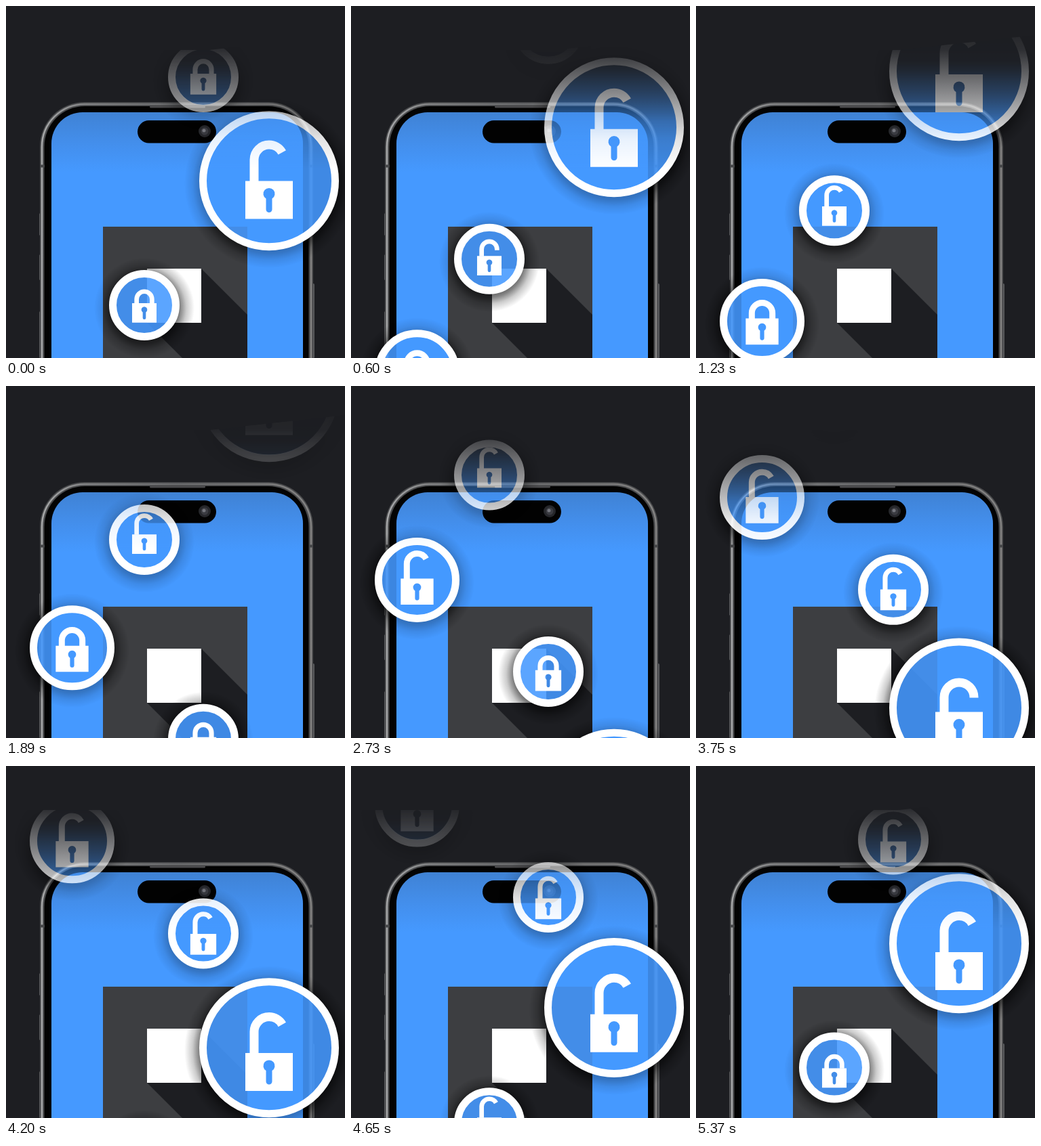
An HTML page for the animation above (5.4 s loop, 500 by 520 pixels).

```html
<!DOCTYPE html>
<html lang="en">
<head>
<meta charset="utf-8">
<title>Floating locks</title>
<style>
  html, body { margin: 0; width: 100%; height: 100%; overflow: hidden; background: #1d1e22; }
  svg { display: block; width: 500px; height: 520px; }
</style>
</head>
<body>
<svg id="stage" viewBox="0 0 500 520" xmlns="http://www.w3.org/2000/svg">
  <defs>
    <linearGradient id="screen" gradientUnits="userSpaceOnUse" x1="0" y1="157" x2="0" y2="245">
      <stop offset="0" stop-color="#3f82d4"/>
      <stop offset=".45" stop-color="#438de9"/>
      <stop offset="1" stop-color="#4599ff"/>
    </linearGradient>
    <linearGradient id="rim" gradientUnits="userSpaceOnUse" x1="50" y1="0" x2="453" y2="0">
      <stop offset="0" stop-color="#a9aaab"/>
      <stop offset=".15" stop-color="#868788"/>
      <stop offset=".5" stop-color="#6a6b6d"/>
      <stop offset="1" stop-color="#858483"/>
    </linearGradient>
    <linearGradient id="fade" gradientUnits="userSpaceOnUse" x1="0" y1="40" x2="0" y2="240">
      <stop offset="0" stop-color="#fff" stop-opacity=".04"/>
      <stop offset=".125" stop-color="#fff" stop-opacity=".08"/>
      <stop offset=".33" stop-color="#fff" stop-opacity=".34"/>
      <stop offset=".55" stop-color="#fff" stop-opacity=".61"/>
      <stop offset=".78" stop-color="#fff" stop-opacity=".88"/>
      <stop offset="1" stop-color="#fff"/>
    </linearGradient>
    <linearGradient id="glassFade" gradientUnits="userSpaceOnUse" x1="0" y1="80" x2="0" y2="170">
      <stop offset="0" stop-color="#fff" stop-opacity=".1"/>
      <stop offset=".35" stop-color="#fff" stop-opacity=".55"/>
      <stop offset="1" stop-color="#fff"/>
    </linearGradient>
    <mask id="fadeMask" maskUnits="userSpaceOnUse" x="0" y="0" width="500" height="520">
      <rect width="500" height="520" fill="url(#fade)"/>
    </mask>
    <mask id="glassMask" maskUnits="userSpaceOnUse" x="0" y="0" width="500" height="520">
      <rect width="500" height="520" fill="url(#glassFade)"/>
    </mask>
    <!-- shadows are faint on the bright screen -->
    <mask id="shadowMask" maskUnits="userSpaceOnUse" x="0" y="0" width="500" height="520">
      <rect width="500" height="520" fill="#fff"/>
      <rect x="67" y="157" width="371" height="440" rx="47" fill="#777"/>
      <path d="M143 326H356V520H143Z" fill="#fff"/>
    </mask>
    <clipPath id="top"><path d="M0 65H300L500 43V520H0Z"/></clipPath>
  </defs>

  <rect width="500" height="520" fill="#1d1e22"/>

  <!-- phone -->
  <g fill="#57585a">
    <rect x="49" y="306" width="4" height="33" rx="1.5"/>
    <rect x="49" y="367" width="4" height="38" rx="1.5"/>
    <rect x="49" y="451" width="4" height="69" rx="1.5"/>
    <rect x="451" y="410" width="4" height="110" rx="1.5"/>
  </g>
  <rect x="50" y="142" width="403" height="460" rx="66" fill="#4a4b4d"/>
  <rect x="53" y="145" width="397" height="460" rx="63" fill="none" stroke="url(#rim)" stroke-width="2.500"/>
  <rect x="56.500" y="148" width="390" height="460" rx="60" fill="#030303"/>
  <rect x="212" y="147.500" width="82" height="3" rx="1.5" fill="#4b4b4d"/>
  <path d="M50 236.500h7M447 236.500h6" stroke="#454648" stroke-width="4"/>
  <rect x="67" y="157" width="371" height="440" rx="46" fill="url(#screen)"/>
  <rect x="194" y="169" width="116" height="33.500" rx="16.750" fill="#020202"/>
  <circle cx="293" cy="185" r="9" fill="#26272b"/>
  <circle cx="293" cy="185" r="5.500" fill="#3b3c42"/>
  <circle cx="292" cy="184" r="2.500" fill="#74757c"/>

  <!-- card -->
  <rect x="143" y="326" width="213" height="194" fill="#3d3e41"/>
  <path d="M288 388L356 456V520H260L208 468Z" fill="#1d1e22"/>
  <rect x="208" y="388" width="80" height="80" fill="#fff"/>

  <g clip-path="url(#top)">
    <g mask="url(#fadeMask)">
      <g id="shadows" mask="url(#shadowMask)"></g>
      <g id="discs" mask="url(#glassMask)"></g>
      <g id="rings"></g>
    </g>
  </g>
</svg>
<script>
const LOOP = 5400, STEP = 30;
const RING = 11, GLOW = 22;

// y: centre at time 0, rise: distance per loop, wrap: time it re-enters below
// keys: [time, lock offset, how far open]
const bubbles = [
  { x: 204, r: 52, y: 442, rise: 614, wrap: 4100, scale: .515,
    keys: [[0, -3, 0], [450, -4.2, 0], [800, -5.1, 1], [4100, -13.7, 1],
           [4101, -8, 1], [4650, -8, 1], [4850, -5.5, 1], [5200, -1.1, 0], [5400, 1.4, 0]] },
  { x: 97.5, r: 62.5, y: 612.5, rise: 645, wrap: 5399, scale: .69,
    keys: [[0, -5.7, 0], [2000, -2.9, 0], [2400, -2.4, 1], [5400, 1.8, 1]] },
  { x: 291, r: 52, y: 105, rise: 641, wrap: 1200, scale: .547,
    keys: [[0, -5, 0], [3000, -1.8, 0], [3350, -1.1, 1], [5400, 3, 1]] },
  { x: 388, r: 103, y: 258.2, rise: 711, wrap: 2400, scale: 1,
    keys: [[0, .4, 1], [2400, 9.1, 1], [2401, .2, 0], [3580, 5.3, 0], [3920, 6.7, 1], [5400, 13.1, 1]] }
];

const BODY = "M-35 0H35V56H-35Z" +
  "M-4.500 26V42a4.500 4.500 0 0 0 9 0V26a8.500 8.500 0 1 0-9 0Z";
const BEND = 22, LEG = 11.5;

const byId = id => document.getElementById(id);

function add(parent, markup) {
  byId(parent).insertAdjacentHTML("beforeend", markup);
  return byId(parent).lastElementChild;
}

bubbles.forEach((b, i) => {
  const out = b.r + GLOW, at = d => (b.r + d) / out;
  b.shadow = add("shadows", `<g>
    <radialGradient id="glow${i}">
      <stop offset="${at(-8)}" stop-color="#000" stop-opacity="0"/>
      <stop offset="${at(-6)}" stop-color="#000" stop-opacity=".6"/>
      <stop offset="${at(0)}" stop-color="#000" stop-opacity=".5"/>
      <stop offset="${at(10)}" stop-color="#000" stop-opacity=".2"/>
      <stop offset="1" stop-color="#000" stop-opacity="0"/>
    </radialGradient>
    <circle cy="4" r="${out}" fill="url(#glow${i})"/></g>`);
  b.disc = add("discs", `<g><circle r="${b.r - RING + 1}" fill="#4599ff" fill-opacity=".88"/></g>`);
  b.ring = add("rings", `<g>
    <circle r="${b.r - RING / 2}" fill="none" stroke="#fff" stroke-width="${RING}"/>
    <g><path d="${BODY}" fill="#fff" fill-rule="evenodd"/>
    <path fill="none" stroke="#fff" stroke-width="13"/></g></g>`);
  b.lock = b.ring.querySelector("g");
  b.shackle = b.lock.lastElementChild;
});

function pose(keys, t) {
  const n = Math.max(1, keys.findIndex(k => k[0] > t));
  const a = keys[n - 1], z = keys[n];
  const u = (t - a[0]) / (z[0] - a[0]);
  const ease = u * u * (3 - 2 * u);
  return [a[1] + (z[1] - a[1]) * u, a[2] + (z[2] - a[2]) * ease];
}

function draw(t) {
  for (const b of bubbles) {
    const y = b.y - b.rise * (t / LOOP) + (t >= b.wrap ? b.rise : 0);
    const alpha = Math.min(1, Math.max(0, (y + b.r - 60) / 110));
    for (const part of [b.shadow, b.disc, b.ring]) {
      part.setAttribute("transform", `translate(${b.x} ${y})`);
      part.setAttribute("opacity", alpha);
    }
    const [dy, open] = pose(b.keys, t);
    b.lock.setAttribute("transform", `translate(0 ${dy}) scale(${b.scale})`);
    // the shackle lifts while its right leg retracts
    const bendY = -LEG - 20 * open;
    const length = 1 - bendY + Math.PI * BEND + LEG - 2 * LEG * open;
    b.shackle.setAttribute("d", `M${-BEND} 1V${bendY}a${BEND} ${BEND} 0 0 1 ${2 * BEND} 0V1`);
    b.shackle.setAttribute("stroke-dasharray", `${length} 300`);
  }
}

const start = performance.now();
function tick() {
  const t = (performance.now() - start) % LOOP;
  draw(Math.floor(t / STEP) * STEP);
  requestAnimationFrame(tick);
}
tick();
</script>
</body>
</html>
```
